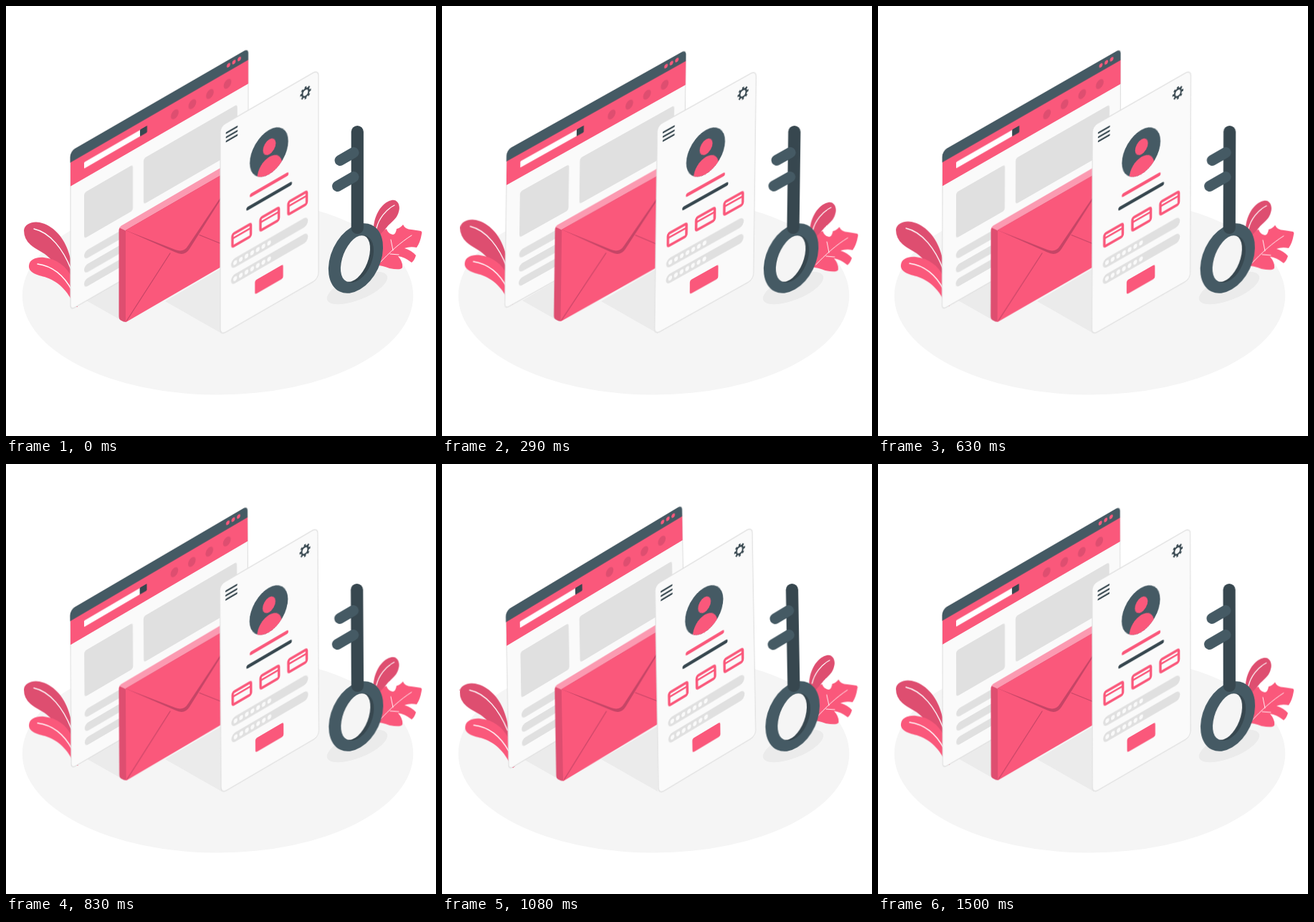
These frames come from a looping animation (600 by 600 pixels, 1540 ms). An HTML page:

```html
<!DOCTYPE html>
<html lang="en">
<head>
<meta charset="utf-8">
<title>Account access</title>
<style>
  :root { --pink: #fa587b; --rose: #de4e70; --wine: #c54566; --slate: #455a64; --ink: #37474f;
          --paper: #fafafa; --floor: #f5f5f5; --shade: #ebebeb; --line: #e0e0e0; }
  html, body { margin: 0; width: 100%; height: 100%; overflow: hidden; background: #fff; }
  svg { display: block; width: 100vw; height: 100vh; }

  .sway { animation: sway 1540ms linear infinite; }
  #plants { transform-origin: 302px 341px; }
  #browser { transform-origin: 214px 242px; }
  #mail { transform-origin: 245px 326px; }
  #phone { transform-origin: 367px 274px; }
  #key { transform-origin: 488px 284px; }
  @keyframes sway {
    0%, 100% { transform: rotate(0deg); }
    22.7% { transform: rotate(.91deg); }
    72.7% { transform: rotate(-1.09deg); }
  }

  .pink { fill: var(--pink); }
  .rose { fill: var(--rose); }
  .wine { fill: var(--wine); }
  .slate { fill: var(--slate); }
  .ink { fill: var(--ink); }
  .floor { fill: var(--floor); }
  .shade { fill: var(--shade); }
  .gray { fill: var(--line); }
  .sheet { fill: var(--paper); stroke: var(--line); stroke-width: 1.3; }
  .stroke { fill: none; stroke-linecap: round; stroke-linejoin: round; }
  .s-pink { stroke: var(--pink); }
  .s-ink { stroke: var(--ink); }
  .s-slate { stroke: var(--slate); }
  .s-wine { stroke: var(--wine); }
  .s-white { stroke: #fff; }
</style>
</head>
<body>
<svg viewBox="0 0 600 600" xmlns="http://www.w3.org/2000/svg">
  <defs>
    <clipPath id="face"><circle cx="78.5" cy="75.2" r="31"/></clipPath>
    <g id="card" class="stroke s-pink">
      <rect x="2" y="2" width="29.6" height="17.4" rx="2.5" stroke-width="4"/>
      <path d="M3 8H31" stroke-width="2.8"/>
    </g>
    <g id="field">
      <rect x="17.3" y="-6.5" width="124" height="13" rx="6.5" class="gray"/>
      <path d="M24 0H79" class="stroke" stroke="#fafafa" stroke-width="6.2" stroke-dasharray="0 9.1"/>
    </g>
  </defs>

  <ellipse cx="295.5" cy="404.2" rx="272.7" ry="138.3" class="floor"/>
  <g class="shade">
    <path d="M112 411L165 380V441Z"/>
    <path d="M222 412L301 366V457Z"/>
    <ellipse cx="490" cy="393.5" rx="45" ry="16.5" transform="rotate(-22 490 393.5)"/>
  </g>

  <g id="plants" class="sway">
    <path class="rose" d="M25 313C26 304 37 300 47 302C66 306 80 323 86 340C92 356 94 370 98 400H92C84 378 72 362 60 351C52 343 42 340 34 333Q25 325 25 313Z"/>
    <path class="pink" d="M32 362C33 353 43 350 53 351C72 353 84 364 91 377L100 420H96C86 396 72 384 54 378C41 375 31 371 32 362Z"/>
    <path class="rose" d="M513 318C511 294 524 274 538 271C546 269 551 278 548 287C545 301 530 303 524 322Z"/>
    <path class="pink" d="M512 361L520 322Q527 312 531 311Q533 318 540 319Q544 318 545 311Q550 310 554 305Q557 312 566 312Q573 313 579 314Q581 315 580 318Q578 330 573 337Q564 335 556 338Q566 341 572 348Q570 355 566 358Q556 350 547 349Q554 357 553 365Q551 369 535 366Q526 362 512 361Z"/>
    <g class="stroke s-white">
      <path stroke-width="1.4" d="M39 311C62 316 80 340 91 368M44 360C66 363 82 378 92 397"/>
      <path stroke-width="1.2" d="M517 310C520 297 530 284 542 278"/>
      <path stroke-width=".9" d="M522 358C535 344 550 330 566 320M540 341L537 326M536 346L548 347"/>
    </g>
  </g>

  <g id="browser" class="sway">
    <g transform="matrix(.866 -.5 0 1 90 202.6)">
      <rect width="286.4" height="221.5" rx="6" class="sheet"/>
      <rect y="15" width="286.4" height="34" class="pink"/>
      <path class="slate" d="M-.5 15.7V8a8 8 0 0 1 8-8H280.4a6 6 0 0 1 6 6V15.7Z"/>
      <g class="pink">
        <circle cx="254.6" cy="7.3" r="2.8"/>
        <circle cx="263.3" cy="7.3" r="2.8"/>
        <circle cx="272" cy="7.3" r="2.8"/>
      </g>
      <g class="rose">
        <circle cx="168" cy="32.5" r="6.2"/>
        <circle cx="196.3" cy="32.5" r="6.2"/>
        <circle cx="224.6" cy="32.5" r="6.2"/>
        <circle cx="252.9" cy="32.5" r="6.2"/>
      </g>
      <rect x="22" y="26.5" width="91" height="8.7" rx="1" fill="#fff"/>
      <rect x="112" y="26" width="11.5" height="9.6" rx="1" class="ink"/>
      <g class="gray">
        <rect x="22" y="69" width="78.5" height="64" rx="4"/>
        <rect x="117.8" y="69" width="151" height="64" rx="4"/>
        <rect x="22" y="151.3" width="78.5" height="11.4" rx="5.7"/>
        <rect x="22" y="171" width="78.5" height="11.4" rx="5.7"/>
        <rect x="22" y="190.7" width="78.5" height="11.4" rx="5.7"/>
      </g>
    </g>
  </g>

  <g id="mail" class="sway">
    <g transform="translate(0 -1)">
      <path fill="#fb9ab1" d="M158 312Q158 309.5 161 307.5L324 212.5L333 218L167 315Z"/>
      <path class="rose" d="M157.5 314Q157.5 310 160.5 311.5L168 315V442Q164 442 160 439.5Q157.5 438 157.5 434Z"/>
      <path class="pink" d="M167 314L333 218V346L171 440Q168 442 167 442Z"/>
      <path class="stroke s-wine" stroke-width="1.2" d="M168.500 440L229 346M270 320.500L333 346"/>
      <path class="wine" d="M167 314L236 344.500Q249 351 256 340L333 218Z"/>
      <path class="pink" d="M167 314L236 341Q248 345.500 254 335.500L333 218Z"/>
    </g>
  </g>

  <g id="phone" class="sway">
    <g transform="matrix(.866 -.5 0 1 299 168)">
      <rect width="158.2" height="291.5" rx="8" class="sheet"/>
      <path class="stroke s-ink" stroke-width="2.5" d="M10 14.1H27M10 19.9H27M10 25.7H27"/>
      <g fill="none" class="s-ink">
        <circle cx="137.4" cy="21.7" r="5.3" stroke-width="2.6"/>
        <circle cx="137.4" cy="21.7" r="7.3" stroke-width="2.8" pathLength="16" stroke-dasharray="1" stroke-dashoffset=".5"/>
      </g>
      <circle cx="78.5" cy="75.2" r="31" class="slate"/>
      <circle cx="79.1" cy="68" r="10.4" class="pink"/>
      <circle cx="79.5" cy="102" r="20" class="pink" clip-path="url(#face)"/>
      <path class="stroke s-pink" stroke-width="5" d="M50 120.8H107.5"/>
      <path class="stroke s-ink" stroke-width="5" d="M44.5 136.8H113"/>
      <use href="#card" x="17.6" y="158.4"/>
      <use href="#card" x="62.7" y="158.4"/>
      <use href="#card" x="107.7" y="158.4"/>
      <use href="#field" y="202"/>
      <use href="#field" y="224.3"/>
      <rect x="55.8" y="243" width="45.5" height="19.6" rx="3" class="pink"/>
    </g>
  </g>

  <g id="key" class="sway">
    <ellipse rx="34.3" ry="51.6" transform="translate(488 352) rotate(25.5)" class="slate"/>
    <ellipse rx="20.4" ry="34.6" transform="translate(490 353) rotate(22.5)" class="ink"/>
    <ellipse rx="17.6" ry="34" transform="translate(487.5 352.5) rotate(21.5)" class="floor"/>
    <rect x="481.7" y="167" width="17.2" height="151" rx="8.6" class="ink"/>
    <path class="stroke s-slate" stroke-width="15" d="M466 215.5L485 204.5M462.500 251.500L485 238.500"/>
  </g>
</svg>
</body>
</html>
```
